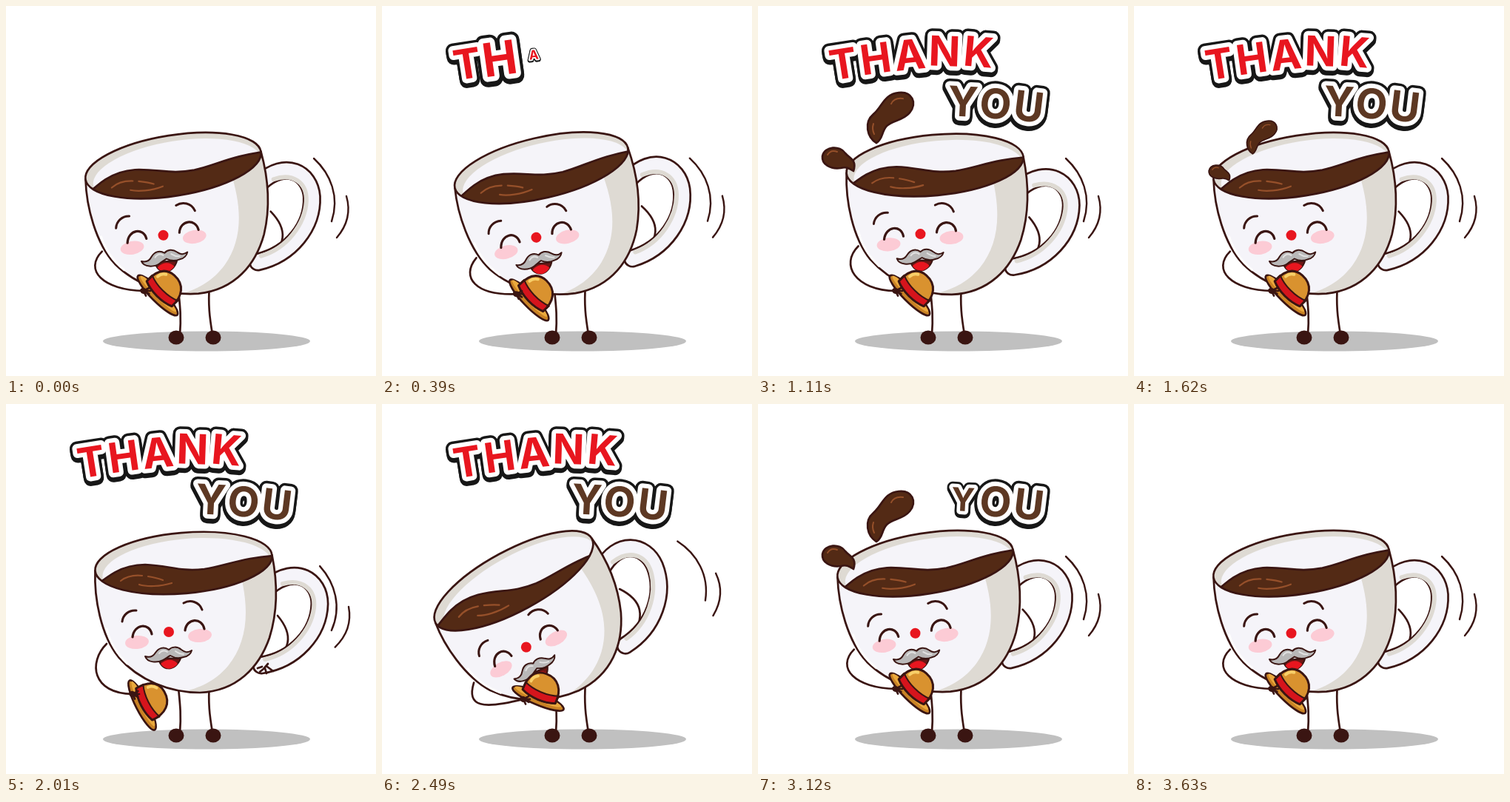
These frames come from a looping animation (500 px wide and 500 px high, 3.9 s). An HTML page with a canvas:

```html
<!DOCTYPE html>
<html lang="en">
<head>
<meta charset="utf-8">
<title>Thank you</title>
<style>
html, body { margin: 0; width: 100%; height: 100%; overflow: hidden; background: #fff; }
canvas { display: block; width: 100vw; height: 100vh; }
</style>
</head>
<body>
<canvas id="stage" width="500" height="500"></canvas>
<script>
const ctx = document.getElementById('stage').getContext('2d');
const LOOP = 3900, STEP = 30, RAD = Math.PI / 180;
const INK = '#3a1512', LIGHT = '#f5f4f9', SHADE = '#dedad3';
const COFFEE = '#532a15', GLINT = '#96502a', RED = '#e8161f', LINE = 2.7;

// [time, value] pairs, eased between neighbours; the second bow repeats the first
const BOW = 1805;
const twice = keys => [...keys, ...keys.map(([t, v]) => [t + BOW, v])];
const TILT = twice([[0, -4], [205, 0], [670, -23.5], [972, .7], [1080, .7], [1180, -4]]);
const HAT_OUT = twice([[0, 0], [205, 1], [240, 1.08], [480, 0]]);
const SPLASH = twice([[820, 0], [975, 1], [1500, 1], [1800, 0]]);
const HOP = twice([[985, 0], [1050, -6], [1080, -6], [1120, 0]]);

// letter, centre x, centre y, rotation, colour
const LETTERS = [
  ['T', 115, 78, -9, RED], ['H', 159, 71, -8, RED], ['A', 205, 66, -6, RED],
  ['N', 252, 61, 2, RED], ['K', 298, 62, 5, RED],
  ['Y', 277, 129, 3, '#5d3823'], ['O', 321, 132, 6, '#5d3823'], ['U', 366, 136, 7, '#5d3823']
];

const shape = d => new Path2D(d);
const bodyShape = drop => shape(`M120.5 ${225 + drop}C119 262 128 312 152 342C180 374 222 390 262 390C312 388 342 356 356 316C366 284 368 246 359.5 ${204 + drop}Z`);
const bodyShade = shape('M316 226C330 280 326 322 300 354C280 377 260 384 232 391L380 400V190Z');
const rim = new Path2D();
rim.ellipse(240, 215, 120, 41, -5 * RAD, 0, 7);
const rimInside = new Path2D();
rimInside.ellipse(245, 224, 115, 42, -5 * RAD, 0, 7);
const coffee = shape('M100 262C140 230 156 217 188 217C220 218 235 227 268 223C300 218 318 207 375 204V290H100Z');
const glints = shape('M155 239C164 232 174 231 184 232M192 233C198 234 204 235 212 238M180 244C190 247 208 247 224 242');
const handle = shape('M356 246C392 217 424 238 424 270C423 310 390 346 345 353');
const handleShade = shape('M374 243C400 236 419 250 416 276C412 306 386 337 350 345');
const hipArm = shape('M367 286C389 312 386 334 352 356');
const hipHand = shape('M354 351L348 358L343 362M350 357L352 364M353 355L361 361M346 355L340 357');
const brows = shape('M157 294C158 285 166 278 176 279M240 269C249 264 261 267 265 278');
const eyes = shape('M171 315C173 297 194 295 197 311M242 306C244 289 265 288 268 304');
const mouth = shape('M206 343C209 362 229 362 236 344Z');
const tongue = shape('M209 351C218 343 227 345 232 351C225 360 215 360 209 351Z');
const moustache = shape('M220 332C213 327 206 330 202 336C199 341 194 343 188 341C191 350 205 350 212 346C217 343 220 341 222 340C227 343 234 344 240 342C246 341 250 337 251 333C245 337 241 335 237 332C231 327 224 328 220 332Z');
const bigDrop = shape('M160 186C147 178 143 158 156 147C168 137 170 120 190 118C208 116 216 132 205 145C196 156 182 155 174 163C167 170 169 181 160 186Z');
const smallDrop = shape('M129 223C123 219 119 217 112 219C98 221 86 214 87 203C90 189 111 188 118 199C124 206 134 208 129 223Z');
const crown = shape('M-24 -3C-25 -22 -19 -34 -3 -35C15 -36 25 -23 24 -3C10 3 -10 3 -24 -3Z');
const band = shape('M-24.5 -14C-10 -8 10 -8 24.5 -14L24 -3C10 3 -10 3 -24 -3Z');
const swing = shape('M416 206C439 227 451 258 440 291M460 257C467 281 459 299 447 313');
const legs = shape('M233 384C235 404 237 420 235 444M275 376C273 404 275 420 279 444');

function at(keys, t) {
  if (t <= keys[0][0]) return keys[0][1];
  for (let i = 1; i < keys.length; i++) {
    const [t1, v1] = keys[i];
    if (t < t1) {
      const [t0, v0] = keys[i - 1];
      return v0 + (v1 - v0) * (1 - Math.cos(Math.PI * (t - t0) / (t1 - t0))) / 2;
    }
  }
  return keys[keys.length - 1][1];
}
const clamp = v => Math.max(0, Math.min(1, v));
const mix = (a, b, k) => a + (b - a) * k;

function paint(path, fill, stroke, width = LINE) {
  if (fill) { ctx.fillStyle = fill; ctx.fill(path); }
  if (stroke) { ctx.strokeStyle = stroke; ctx.lineWidth = width; ctx.stroke(path); }
}
function oval(x, y, rx, ry, fill, stroke, angle = 0) {
  const p = new Path2D();
  p.ellipse(x, y, rx, ry, angle * RAD, 0, 7);
  paint(p, fill, stroke);
}
function group(draw) { ctx.save(); draw(); ctx.restore(); }
function turn(x, y, deg) {
  ctx.translate(x, y);
  ctx.rotate(deg * RAD);
  ctx.translate(-x, -y);
}

function drawLegs() {
  oval(271, 453, 140, 13.5, '#c0c0c0');
  paint(legs, null, INK);
  oval(230, 448, 10.5, 9.5, INK);
  oval(280, 448, 10.5, 9.5, INK);
}

function drawDrop(path, x, y, k, lift, shine) {
  if (k <= .02) return;
  group(() => {
    ctx.translate(x, mix(y + 40, y, k) + lift);
    ctx.scale(k, k);
    ctx.translate(-x, -y);
    paint(path, COFFEE, INK);
    paint(shape(shine), null, GLINT, 2);
  });
}

function drawFace() {
  oval(177, 322, 16, 9, '#fccbd5', null, -6);
  oval(262, 313, 16, 9, '#fccbd5', null, -6);
  paint(brows, null, INK, 3);
  paint(eyes, null, INK, 3.2);
  oval(220, 308, 7, 7, RED);
  paint(mouth, '#6d1715', INK, 2);
  paint(tongue, RED);
  paint(moustache, '#b9b8b8', INK, 2);
  paint(shape('M207 337C211 332 215 333 218 335M229 334C233 337 236 338 240 338'), null, '#e2e2e2', 2);
}

function drawCup(bow, hatOut) {
  const drop = 4 * bow;
  const body = bodyShape(drop);
  paint(hipArm, null, INK);
  group(() => {
    ctx.translate(-bow, 1.5 * drop);
    paint(handle, null, INK, 25);
    paint(handle, null, LIGHT, 19.6);
    paint(handleShade, null, SHADE, 6);
  });
  if (hatOut > .5) paint(hipHand, null, INK);

  paint(body, LIGHT);
  group(() => {
    ctx.clip(body);
    ctx.translate(11 * bow, 0);
    paint(bodyShade, SHADE);
  });
  paint(body, null, INK);
  paint(shape('M136 304C141 324 151 339 164 351'), null, '#fff', 3);

  group(() => {
    ctx.translate(0, drop);
    paint(rim, SHADE);
    group(() => {
      ctx.clip(rim);
      paint(rimInside, LIGHT);
      turn(215, 217, 8 * bow);
      paint(coffee, COFFEE, INK);
      paint(glints, null, GLINT, 2.2);
    });
    paint(rim, null, INK);
  });
  drawFace();
}

function drawHat(x, y, deg) {
  group(() => {
    ctx.translate(x, y);
    ctx.rotate(deg * RAD);
    oval(0, 0, 37.5, 8.5, '#c98224', INK);
    oval(-1, -2, 34, 5, '#eaa93d');
    paint(crown, '#d9922f');
    paint(shape('M-12 -28C-17 -25 -18 -22 -18 -18'), null, '#f8cf69', 4);
    paint(band, '#d5141c', INK, 2);
    paint(crown, null, INK, 3);
  });
}

function drawArm(sx, sy, hx, hy, bow) {
  const arm = new Path2D();
  arm.moveTo(sx, sy);
  arm.bezierCurveTo(sx - 25 + 15 * bow, sy + 25 + 8 * bow, hx - 55, hy - 1 + 15 * bow, hx, hy);
  paint(arm, null, INK);
}
function drawHand(x, y) {
  oval(x, y, 5, 4, INK, null, 20);
  const fingers = new Path2D();
  for (const a of [-35, 0, 35, 70]) {
    fingers.moveTo(x, y);
    fingers.lineTo(x + 9 * Math.cos(a * RAD), y + 7 * Math.sin(a * RAD));
  }
  paint(fingers, null, INK);
}

function drawText(t) {
  // letters pop in and out one after another, swelling a little on the way
  const scales = LETTERS.map((_, i) => {
    const k = clamp((t - 270 - i * 55) / 90) * (1 - clamp((t - 2610 - i * 90) / 90));
    return k * (1 + 2 * (1 - k));
  });
  const layer = draw => LETTERS.forEach(([ch, x, y, deg, color], i) => {
    if (scales[i] < .02) return;
    group(() => {
      ctx.translate(x, y);
      ctx.rotate(deg * RAD);
      ctx.scale(scales[i], scales[i]);
      draw(ch, color);
    });
  });
  const outline = (color, width, dx, dy) => layer(ch => {
    ctx.strokeStyle = color;
    ctx.lineWidth = width;
    ctx.strokeText(ch, dx, dy);
  });
  ctx.font = '700 56px Inter, "Open Sans", sans-serif';
  ctx.textAlign = 'center';
  ctx.textBaseline = 'alphabetic';
  outline('#171717', 19, 0, 23);
  outline('#171717', 19, 0, 20);
  outline('#fff', 12, 0, 20);
  layer((ch, color) => { ctx.fillStyle = color; ctx.fillText(ch, 0, 20); });
}

function draw(t) {
  ctx.clearRect(0, 0, 500, 500);
  ctx.lineCap = ctx.lineJoin = 'round';
  const tilt = at(TILT, t), out = at(HAT_OUT, t), splash = at(SPLASH, t);
  const bow = clamp((-4 - tilt) / 19.5);
  const px = 242 + 16 * bow, py = 416 + 3 * bow;

  // shoulder follows the cup
  const c = Math.cos(tilt * RAD), s = Math.sin(tilt * RAD);
  const sx = px - 106 * c + 92 * s, sy = py - 106 * s - 92 * c;
  const hx = mix(mix(186, 191, bow), 171, out);
  const hy = mix(mix(385, 399, bow), 392, out);

  drawLegs();
  group(() => {
    turn(284, 297, 5.5 * out - 9.5 * bow);
    paint(swing, null, INK, 2.4);
  });
  group(() => {
    ctx.translate(px - 242, py - 416);
    turn(242, 416, tilt);
    drawCup(bow, out);
  });
  drawDrop(bigDrop, 161, 186, splash, at(HOP, t), 'M180 133C183 127 189 125 196 126M156 160C154 166 155 170 157 174');
  drawDrop(smallDrop, 128, 220, splash, 0, 'M94 201C97 196 102 195 107 197');
  drawArm(sx, sy, hx, hy, bow);
  drawHat(mix(mix(205, 211, bow), 184, out), mix(mix(391, 398, bow), 407, out), 45 - 22 * bow + 18 * out);
  drawHand(hx, hy);
  drawText(t);
}

const start = performance.now();
function frame() {
  const t = (performance.now() - start) % LOOP;
  draw(Math.min(Math.floor(t / STEP) * STEP, 3630));
  requestAnimationFrame(frame);
}
frame();
</script>
</body>
</html>
```
